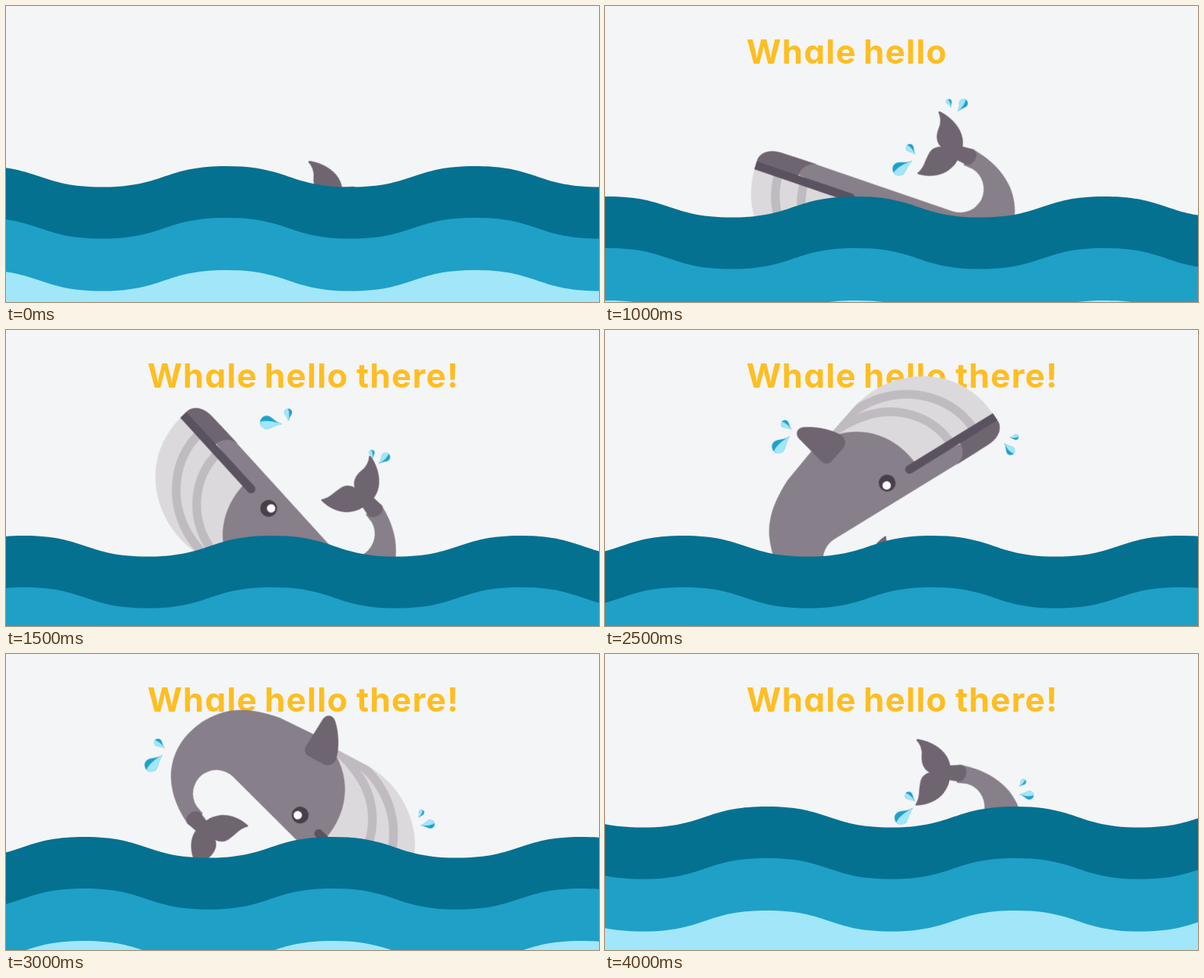
An HTML page for the animation above (4.5 s loop, 780 by 390 pixels).

```html
<!DOCTYPE html>
<html lang="en">
<head>
<meta charset="utf-8">
<title>Whale hello there!</title>
<style>
  html, body { margin: 0; width: 100%; height: 100%; overflow: hidden; background: #f4f5f7; }
  svg { display: block; width: 780px; height: 390px; }
  text {
    font: 700 44px Inter, "Open Sans", sans-serif;
    font-feature-settings: "cv11";
    letter-spacing: 1.2px;
    fill: #ffbe21;
  }
  .skin { fill: #877f89; }
  .dark { fill: #6f6570; }
  .belly { fill: #dbd9dc; }
  .stripe { fill: none; stroke: #bfbbc0; stroke-width: 11.5; }
</style>
</head>
<body>
<svg viewBox="0 0 780 390">
  <defs>
    <path id="bellyShape" d="M318 54C264 70 237 115 237 165C237 188 244 209 254 226L277 265L330 300L360 180L328 51Z"/>
    <clipPath id="bellyClip"><use href="#bellyShape"/></clipPath>
    <g id="drop">
      <path fill="#1fa0c6" d="M0 0C4 -1 5 -3 7 -3A3 3 0 0 1 7 3C5 3 4 1 0 0Z"/>
      <path fill="#a1e6f9" d="M0 0C4 -1 5 -3 7 -3C8.7 -3 9.8 -1.8 10 -.2C7.5 1.1 4 .9 0 0Z"/>
    </g>
  </defs>

  <text class="word" x="186" y="76">Whale</text>
  <text class="word" x="340" y="76">hello</text>
  <text class="word" x="461" y="76">there!</text>

  <g id="whale">
    <!-- origin sits at the centre of the inner tail curve -->
    <g transform="translate(-441 -296)">
      <use class="belly" href="#bellyShape"/>
      <g clip-path="url(#bellyClip)">
        <path class="stripe" d="M330 84C280 98 253 145 253 190C253 212 258 228 268 250"/>
        <path class="stripe" d="M340 118C292 131 269 175 269 213C269 235 272 250 279 268"/>
      </g>
      <path class="skin" d="M340 90L359 88L411 304A31 31 0 0 0 472 296L470 283L494 280C499 345 462 387 402 386.5C368 385 345 371 318 338L272 266L281 262C280 220 307 183 352 170Z"/>
      <path class="dark" d="M317.5 54L328 51C340 47 351 57 355 72L367.5 121C363 109 353 104.5 340 107Z"/>
      <path fill="#5b5260" d="M317.5 54L328 51L359.5 179.5A5.7 5.7 0 0 1 348.5 182.5Z"/>
      <circle cx="362" cy="214.5" r="11" fill="#4a3e4c"/>
      <circle cx="364.8" cy="216" r="5.5" fill="#fff"/>
      <path class="dark" d="M284 252C290 248 298 250 301 256L312 275C315 280 313 286 308 288L270 307C262 310 256 304 258 296C262 280 272 262 284 252Z"/>
      <path class="dark" d="M429 237.5C441 242 455 234 465 237C470 239 474 243 474 245C477 233 488 230 497 228.5C504 226 508 222 510.5 218Q512 216.5 513 219C515 242 506 262 490 269L494.5 283C494 295 473 295 472 284L471 273C452 274 435 262 428 240Q427 237 429 237.5Z"/>
    </g>
  </g>

  <g class="spray">
    <use href="#drop" transform="scale(2.9)"/>
    <use href="#drop" transform="translate(-8 4.5) rotate(82) scale(1.7)"/>
  </g>
  <g class="spray">
    <use href="#drop" transform="scale(1.9)"/>
    <use href="#drop" transform="translate(-1 -10) rotate(-55) scale(1.2)"/>
  </g>
  <g id="sea"></g>
</svg>

<script>
const LOOP = 4500;
const STEPS = 9;

// Key points as [step, x, y, turn]; steps between them are interpolated
const whaleKeys = [
  [0, 456, 293, -75.5], [2, 467, 241, -57.5], [4, 441, 296, 0],
  [5, 318, 302, 72], [6, 277, 184, 148.5], [8, 468, 201, 284.5]
];
const crestKeys = [
  [0, 290, 211], [1, 310, 211], [2, 330, 251], [4, 370, 291],
  [5, 430, 271], [6, 430, 241], [8, 540, 201]
];
const sprayKeys = [
  [[2, 404, 204, 148], [4, 322, 44, 225], [5, 243, 140, 137], [6, 206, 133, 138], [8, 405, 203, 140]],
  [[2, 464, 139, -55], [4, 516, 214, -32], [5, 525, 149, 50], [6, 545, 226, -8], [8, 545, 185, 5]]
];

function sample(keys, step) {
  const next = keys.findIndex(key => key[0] >= step);
  const b = keys[next];
  const a = keys[Math.max(next - 1, 0)];
  const mix = b === a ? 0 : (step - a[0]) / (b[0] - a[0]);
  return a.slice(1).map((value, i) => value + (b[i + 1] - value) * mix);
}

// Hold one value per step, with hard changes between them
function hold(el, prop, valueAt) {
  const frames = Array.from({ length: STEPS + 1 }, (_, i) => ({
    [prop]: valueAt(Math.min(i, STEPS - 1)), offset: i / STEPS, easing: 'step-end'
  }));
  el.animate(frames, { duration: LOOP, iterations: Infinity }).startTime = 0;
}

function follow(el, keys) {
  hold(el, 'transform', step => {
    const [x, y, turn = 0] = sample(keys, step);
    return `translate(${x}px, ${y}px) rotate(${turn}deg)`;
  });
}

function wavePath() {
  const half = 163.5, rise = 27.5, handle = 82;
  let d = `M${-4 * half} 0`;
  for (let i = 0; i < 8; i++) {
    const dy = i % 2 ? -rise : rise;
    d += `c${handle} 0 ${half - handle} ${dy} ${half} ${dy}`;
  }
  return d + `V400H${-4 * half}Z`;
}

const sea = document.getElementById('sea');
['#047191', '#1fa0c6', '#a1e6f9'].forEach((fill, layer) => {
  const wave = document.createElementNS('http://www.w3.org/2000/svg', 'path');
  wave.setAttribute('d', wavePath());
  wave.setAttribute('fill', fill);
  wave.setAttribute('transform', `translate(0 ${Math.round(layer * 68.4)})`);
  sea.append(wave);
});

follow(sea, crestKeys);
follow(document.getElementById('whale'), whaleKeys);

document.querySelectorAll('.spray').forEach((spray, n) => {
  follow(spray, sprayKeys[n]);
  hold(spray, 'opacity', step => step ? 1 : 0);
});

document.querySelectorAll('.word').forEach((word, n) =>
  hold(word, 'opacity', step => step > n ? 1 : 0));
</script>
</body>
</html>
```
